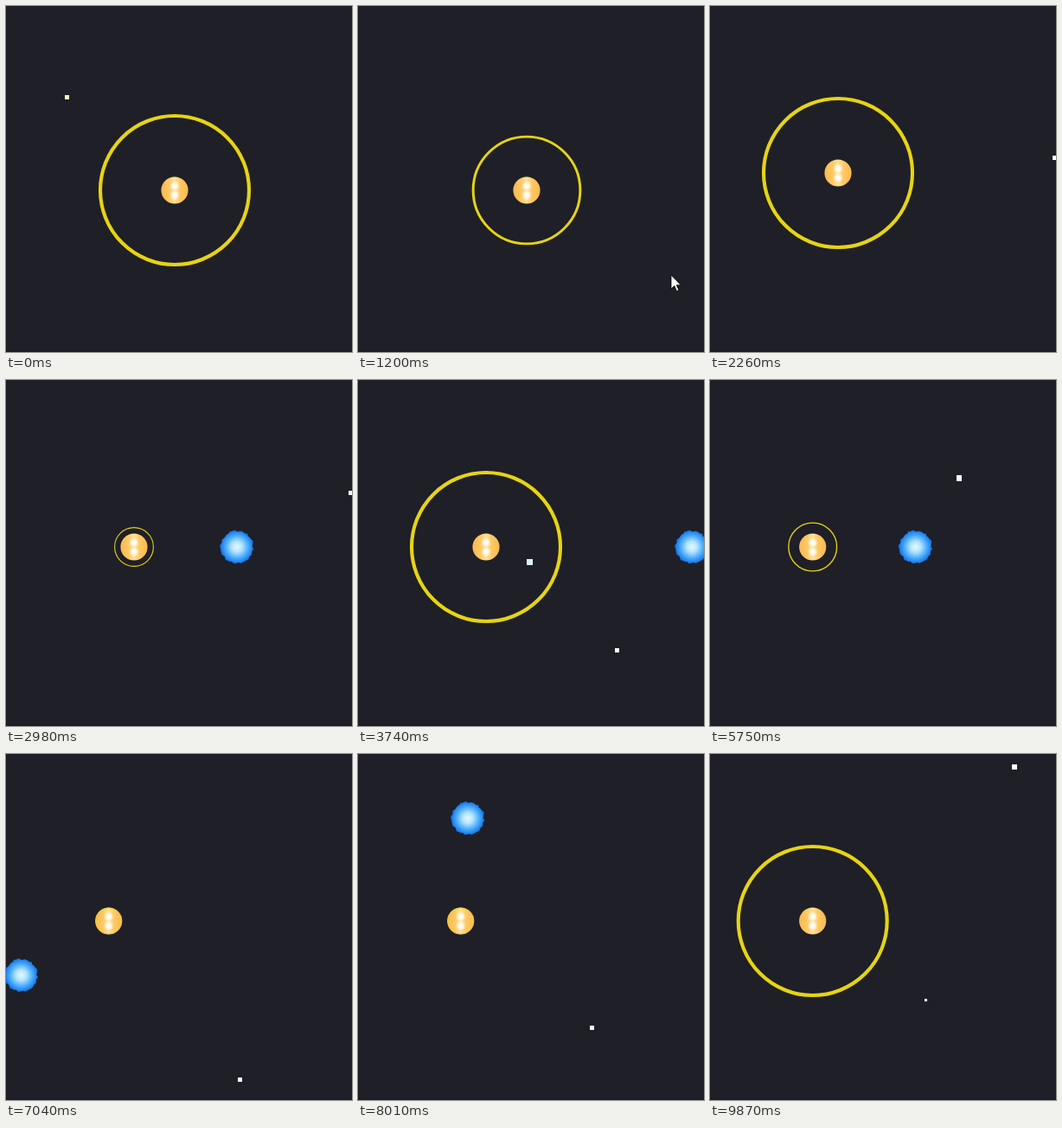
An HTML page for the animation above (9.92 s loop, 400 by 400 pixels).

```html
<!DOCTYPE html>
<html lang="en">
<head>
<meta charset="utf-8">
<title>Charge and fire</title>
<style>
  html, body { margin: 0; width: 100%; height: 100%; overflow: hidden; background: #1f1f28; }
  svg { display: block; width: 100%; height: 100%; }
</style>
</head>
<body>
<svg viewBox="0 0 400 400">
  <defs>
    <linearGradient id="gold">
      <stop offset="0" stop-color="#fbb84e"/>
      <stop offset=".3" stop-color="#fdc966"/>
      <stop offset=".5" stop-color="#fee29a"/>
      <stop offset=".7" stop-color="#fdc966"/>
      <stop offset="1" stop-color="#fbb84e"/>
    </linearGradient>
    <radialGradient id="glow">
      <stop offset="0" stop-color="#fff"/>
      <stop offset=".5" stop-color="#fff8e4"/>
      <stop offset="1" stop-color="#fff0c4" stop-opacity=".2"/>
    </radialGradient>
    <radialGradient id="plasma" gradientUnits="userSpaceOnUse" cx="0" cy="0" r="20">
      <stop offset="0" stop-color="#e4f8ff"/>
      <stop offset=".3" stop-color="#b4e5ff"/>
      <stop offset=".6" stop-color="#58b4fc"/>
      <stop offset=".85" stop-color="#2388f4"/>
      <stop offset="1" stop-color="#1264cc"/>
    </radialGradient>
  </defs>
  <rect width="400" height="400" fill="#1f1f28"/>
  <rect y="398" width="400" height="2" fill="#1b1b22"/>
  <g id="stars" shape-rendering="crispEdges"></g>
  <polygon id="shot" fill="url(#plasma)"/>
  <g id="player">
    <circle r="15.6" fill="url(#gold)"/>
    <ellipse cy="-5" rx="5.5" ry="6" fill="url(#glow)"/>
    <ellipse cy="5.5" rx="5.5" ry="6" fill="url(#glow)"/>
    <circle id="ring" fill="none" stroke="#e6d413"/>
  </g>
  <path id="cursor" d="M362 311v16l3.8-3.4 2.6 6 2.5-1.1-2.6-5.8h4.9z" fill="#fff" stroke="#000" stroke-width=".8"/>
</svg>
<script>
const LOOP = 9920, FULL = 86, SMALL = 15, ORBIT = 119;
const FAST = 0.35, SLOW = 0.062, SHRINK = 0.0985, SHOT_SPEED = 0.22;
const $ = id => document.getElementById(id);
const clamp = (v, lo, hi) => Math.min(hi, Math.max(lo, v));
const mix = (a, b, k) => a + (b - a) * clamp(k, 0, 1);

const scenes = [
  { from: 0, x: 195, y: 213, charge: 956, release: 1230, grow: 200 },
  { from: 2020, x: 148, y: 193, charge: 2335, release: 3200, grow: 200 },
  { from: 5160, x: 118.7, y: 193, charge: 5161, release: 8220, grow: 200, turn: 274 }
];

// Star speed from each moment on, in px per ms
const pace = [[0, 0], [550, FAST], [1510, 0], [2210, SLOW], [2980, FAST],
  [4920, 0], [5160, SLOW], [8220, FAST], [LOOP, 0]];

// Each star passes (x, y) at time `at`
const stars = [
  { x: 70, y: 105, at: 0, size: 5, from: 0, to: 1000, fill: "#fdf3bd" },
  { x: 398, y: 131, at: 2980, size: 5, from: 2020, to: 3220, fill: "#fff" },
  { x: 198, y: 211, at: 3740, size: 7, from: 3190, to: 4920, fill: "#d9f2f6" },
  { x: 299, y: 313, at: 3740, size: 5, from: 3400, to: 4920, fill: "#f4fbee" },
  { x: 24, y: 400, at: 3760, size: 6, from: 3760, to: 4920, fill: "#fff" },
  { x: 288, y: 113.5, at: 5750, size: 6.5, from: 5160, to: 6200, fill: "#fffdf0" },
  { x: 270.5, y: 316.5, at: 8010, size: 5, from: 6500, to: 9230, fill: "#f4f4f4" },
  { x: 352, y: 15, at: 9870, size: 6, from: 8700, to: LOOP, fill: "#fff" },
  { x: 249.5, y: 284.5, at: 9870, size: 3, from: 9450, to: LOOP, fill: "#fff" }
];

for (const s of stars) {
  s.node = document.createElementNS("http://www.w3.org/2000/svg", "rect");
  s.node.setAttribute("width", s.size);
  s.node.setAttribute("height", s.size);
  s.node.setAttribute("x", s.x - s.size / 2);
  s.node.setAttribute("fill", s.fill);
  $("stars").append(s.node);
}

let seed = 7;
const random = () => (seed = seed * 16807 % 2147483647) / 2147483647;
$("shot").setAttribute("points", Array.from({ length: 56 }, (_, i) => {
  const a = i / 56 * 2 * Math.PI, r = 17.6 + 2.4 * random();
  return `${(r * Math.cos(a)).toFixed(1)},${(r * Math.sin(a)).toFixed(1)}`;
}).join(" "));

function travel(t) {
  let sum = 0;
  for (let i = 0; i + 1 < pace.length; i++) {
    sum += clamp(t - pace[i][0], 0, pace[i + 1][0] - pace[i][0]) * pace[i][1];
  }
  return sum;
}

function ringRadius(s, t) {
  const charged = u => clamp(FULL - (u - s.charge) * SHRINK, SMALL, FULL);
  return t < s.release ? charged(t) : mix(charged(s.release), FULL, (t - s.release) / s.grow);
}

function show(node, on) {
  node.setAttribute("visibility", on ? "visible" : "hidden");
}

function drawShot(s, t) {
  const born = s.charge + 360, live = s.release > born && t >= born;
  show($("shot"), live);
  if (!live) return;
  const angle = mix(0, s.turn || 0, (t - 5900) / 2110) * Math.PI / 180;
  const dist = ORBIT + Math.max(0, t - s.release) * SHOT_SPEED;
  const x = s.x + dist * Math.cos(angle), y = s.y + dist * Math.sin(angle);
  $("shot").setAttribute("transform", `translate(${x} ${y}) scale(${mix(0.2, 1, (t - born) / 150)})`);
}

function draw(t) {
  const s = scenes.filter(c => c.from <= t).pop();
  const r = ringRadius(s, t);
  $("player").setAttribute("transform", `translate(${s.x} ${s.y})`);
  $("ring").setAttribute("r", r);
  $("ring").setAttribute("stroke-width", r * 0.048);
  drawShot(s, t);
  for (const star of stars) {
    show(star.node, t >= star.from && t < star.to);
    star.node.setAttribute("y", star.y - travel(t) + travel(star.at) - star.size / 2);
  }
  show($("cursor"), t >= 1000 && t < 1450);
}

const start = performance.now();
function tick() {
  draw((performance.now() - start) % LOOP);
  requestAnimationFrame(tick);
}
tick();
</script>
</body>
</html>
```
